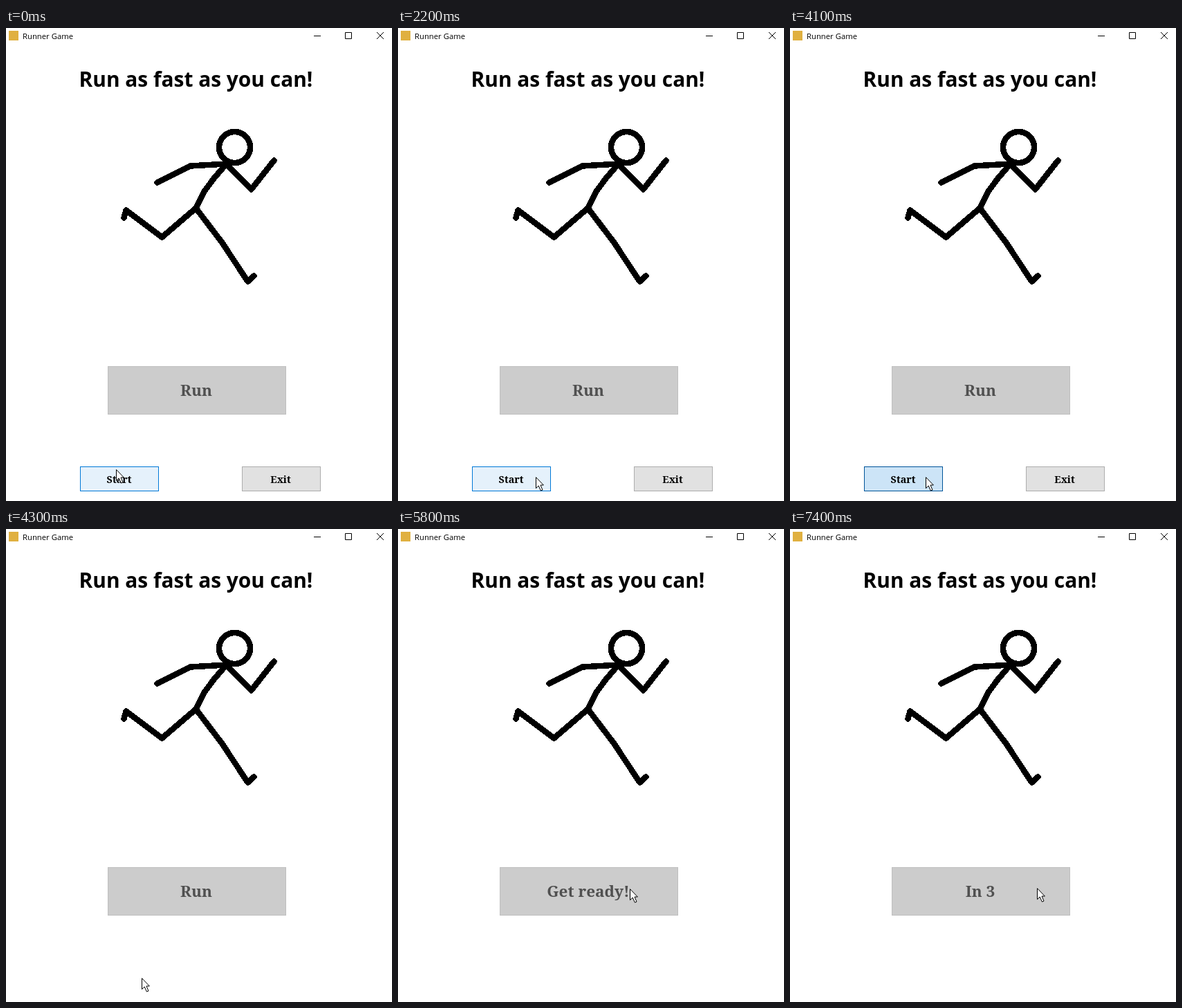
An HTML page that plays this animation: 558x684 px, repeating every 8 s.

```html
<!DOCTYPE html>
<html lang="en">
<head>
<meta charset="utf-8">
<title>Runner Game</title>
<style>
  html, body { margin: 0; width: 100%; height: 100%; overflow: hidden; background: #fff; }
  svg { display: block; width: 558px; height: 684px; user-select: none; }
  .caption { font: 11.3px "Open Sans", "Noto Sans", sans-serif; }
  .title { font: bold 29.9px "Open Sans", "Noto Sans", sans-serif; }
  .big { font: bold 22.5px "Noto Serif", serif; fill: #505050; text-anchor: middle; }
  .small { font: bold 14.3px "Noto Serif", serif; text-anchor: middle; }
  .line { fill: none; stroke: #000; }
  .runner { stroke-width: 8.5; stroke-linecap: round; stroke-linejoin: round; shape-rendering: crispEdges; }
</style>
</head>
<body>
<svg viewBox="0 0 558 684">
  <rect width="558" height="684" fill="#fff"/>
  <rect x="4" y="4" width="14" height="14" fill="#e0b040"/>
  <text class="caption" x="24" y="16">Runner Game</text>
  <path class="line" d="M445 11.5h10M490.5 6.5h9v9h-9z"/>
  <path class="line" d="M536 6l10 10M546 6l-10 10"/>

  <text class="title" x="105.5" y="85">Run as fast as you can!</text>

  <g class="line runner">
    <circle cx="330.5" cy="172.5" r="22.5"/>
    <g transform="translate(.5 .5)">
      <path d="M218 223L266 199L318 196L354 233L387 191"/>
      <path d="M318 196L300 217L286 236L274 260"/>
      <path d="M170 274L173 263L225 302L274 260L312 310L349 366L358 358"/>
    </g>
  </g>

  <rect x="147.5" y="489.5" width="257" height="69" fill="#ccc" stroke="#bfbfbf"/>
  <text class="big" id="run" x="275" y="532">Run</text>

  <g id="menu">
    <rect id="start" x="107.5" y="634.5" width="113" height="35"/>
    <text class="small" x="163.5" y="658">Start</text>
    <rect x="341.5" y="634.5" width="113" height="35" fill="#e1e1e1" stroke="#adadad"/>
    <text class="small" x="397" y="658">Exit</text>
  </g>

  <path id="cursor" fill="#fff" stroke="#000"
    d="M.5 .7V16.6L4.2 13L7.4 20.1L10 19L7 12H11.4Z"/>
</svg>
<script>
  const LOOP = 8000, STEP = 100, SECOND = 1000;
  const CLICK = 4100, RELEASE = 4300;
  const el = id => document.getElementById(id);
  const run = el("run"), menu = el("menu"), start = el("start"), cursor = el("cursor");

  const HOME = { x: 159, y: 638 };
  const strokes = [
    { from: 0, to: 300, x: 156, y: 643 },
    { from: 400, to: 800, x: 193, y: 649, ease: "out" },
    { from: 2100, to: 2500, x: 207, y: 649, ease: "out" },
    { from: 2500, to: 2800, x: 196, y: 649 },
    { from: 4800, to: 5200, x: 262, y: 585, ease: "in" },
    { from: 5200, to: 5400, x: 320, y: 529 },
    { from: 5500, to: 5800, x: 335, y: 520 },
    { from: 5800, to: 6300, x: 364, y: 519, ease: "out" },
    { from: 7200, to: 7400, x: 357, y: 519 }
  ];
  const countdown = ["Run", "Get ready!", "Get set!", "In 3"];

  const easing = {
    in: u => u ** 1.6,
    out: u => 1 - (1 - u) ** 2,
    none: u => u
  };
  const clamp = u => Math.max(0, Math.min(1, u));

  // Chains the strokes; the pointer is sampled once per step.
  function pointer(t) {
    const now = Math.floor(t / STEP) * STEP;
    let { x, y } = HOME;
    for (const s of strokes) {
      const k = easing[s.ease || "none"](clamp((now - s.from) / (s.to - s.from)));
      x += (s.x - x) * k;
      y += (s.y - y) * k;
    }
    return [Math.round(x), Math.round(y)];
  }

  function draw(t) {
    const beat = Math.max(0, Math.floor((t - RELEASE) / SECOND));
    const label = countdown[Math.min(beat, countdown.length - 1)];
    if (run.textContent !== label) run.textContent = label;

    const pressed = t >= CLICK;
    start.setAttribute("fill", pressed ? "#cce4f7" : "#e5f1fb");
    start.setAttribute("stroke", pressed ? "#005499" : "#0078d7");
    menu.setAttribute("visibility", t < RELEASE ? "visible" : "hidden");
    cursor.setAttribute("transform", `translate(${pointer(t)})`);
  }

  const origin = performance.now();
  function tick(now) {
    draw(Math.max(0, now - origin) % LOOP);
    requestAnimationFrame(tick);
  }
  draw(0);
  requestAnimationFrame(tick);
</script>
</body>
</html>
```
